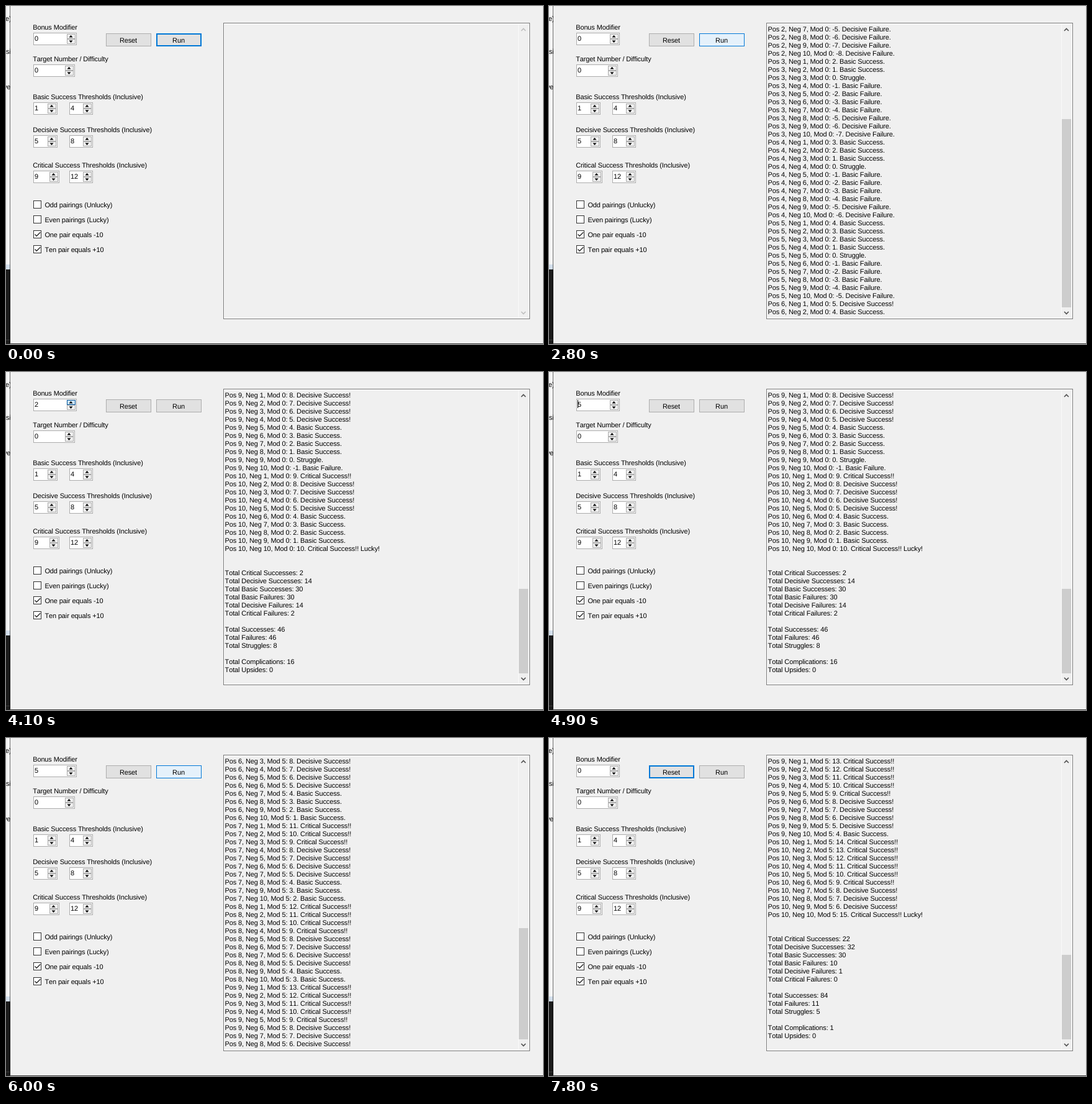
Recreate the animation shown at these times as an HTML page. Size 865 by 544 pixels, loop 8000 ms.

```html
<!DOCTYPE html>
<html lang="en">
<head>
<meta charset="utf-8">
<title>Dice odds</title>
<style>
  html, body { margin: 0; width: 100%; height: 100%; overflow: hidden; background: #f0f0f0; }
  svg { display: block; width: 865px; height: 544px; }
  text {
    font: 11px "Liberation Sans", Arial, sans-serif;
    letter-spacing: -.13px;
    font-kerning: none;
    text-rendering: geometricPrecision;
    white-space: pre;
  }
</style>
</head>
<body>
<svg id="stage" viewBox="0 0 865 544"></svg>
<script>
const LOOP = 8000, ROWS = 36;
const stage = document.getElementById('stage');

function add(tag, attrs, content = '') {
  const el = document.createElementNS('http://www.w3.org/2000/svg', tag);
  set(el, attrs);
  el.textContent = content;
  return stage.appendChild(el);
}
function set(el, attrs) {
  for (const key in attrs) el.setAttribute(key, attrs[key]);
}
const rect = (x, y, width, height, fill) => add('rect', { x, y, width, height, fill });
const label = (x, y, s, more) => add('text', { x, y, fill: '#000', ...more }, s);
const line = (d, stroke, width = 1) =>
  add('path', { d, stroke, fill: 'none', 'stroke-width': width });

// A box whose border lies inside its bounds.
function frame(x, y, w, h) {
  const el = add('rect', {});
  return (fill, stroke, b = 1) => set(el, {
    x: x + b / 2, y: y + b / 2, width: w - b, height: h - b, fill, stroke, 'stroke-width': b
  });
}

const SKIN = {
  idle: ['#e1e1e1', '#adadad', 1],
  focus: ['#e1e1e1', '#0078d7', 2],
  hover: ['#e5f1fb', '#0078d7', 1]
};
const SPIN = {
  idle: ['#f0f0f0', '#acacac'],
  hover: ['#e5f1fb', '#0078d7'],
  press: ['#cce4f7', '#005499']
};

function button(x, s) {
  const paint = frame(x, 44, 73, 21);
  label(x + 36, 59, s, { 'text-anchor': 'middle' });
  return mode => paint(...SKIN[mode]);
}

function spinner(x, y, w, value) {
  frame(x, y, w, 20)('#fff', '#acacac');
  const digits = label(x + 2, y + 13, value);
  const left = x + w - 16, tip = left + 6.5;
  const up = frame(left, y + 2, 14, 8);
  const down = frame(left, y + 10, 14, 8);
  up(...SPIN.idle);
  down(...SPIN.idle);
  add('path', { d: `M${tip} ${y + 4}l3 3.5h-6z` });
  add('path', { d: `M${tip} ${y + 16}l3-3.5h-6z` });
  return { digits, spin: mode => up(...SPIN[mode]) };
}

function checkbox(y, s, on) {
  frame(44, y, 13, 13)('#fff', '#333');
  if (on) line(`M46.5 ${y + 6.5}l2.8 2.8l6-6`, '#222', 1.3);
  label(62.4, y + 11, s);
}

// Windows behind the dialog
rect(0, 0, 865, 544, '#f0f0f0');
rect(0, 0, 7, 416, '#f4f4f4');
[['e)', -1, 24], ['si', 0, 77], ['ve', -4, 134]].forEach(([s, x, y]) => label(x, y, s));
rect(0, 416, 7, 8, '#d3dfec');
rect(0, 424, 7, 120, '#1b1b1b');
rect(0, 537, 6, 1, '#3a3a3a');
rect(7, 0, 4, 543, '#f0f0f0');
rect(6, 0, 1, 544, 'rgba(0,0,0,.55)');
rect(6, 543, 859, 1, '#3c3c3c');

// Form
[[38, 'Bonus Modifier'], [89, 'Target Number / Difficulty'],
 [150, 'Basic Success Thresholds (Inclusive)'],
 [203, 'Decisive Success Thresholds (Inclusive)'],
 [260, 'Critical Success Thresholds (Inclusive)']].forEach(([y, s]) => label(43.2, y, s));
const bonus = spinner(44, 43, 70, 0);
const caret = rect(46, 45, 1, 13, '#000');
[[44, 94, 67, 0], [44, 155, 39, 1], [102, 155, 38, 4], [44, 208, 39, 5],
 [102, 208, 38, 8], [44, 265, 42, 9], [102, 265, 38, 12]].forEach(a => spinner(...a));
const reset = button(161, 'Reset');
const run = button(242, 'Run');
checkbox(313, 'Odd pairings (Unlucky)', false);
checkbox(337, 'Even pairings (Lucky)', false);
checkbox(361, 'One pair equals -10', true);
checkbox(385, 'Ten pair equals +10', true);

// Output box
const output = frame(350, 27, 494, 477);
frame(351, 28, 492, 475)('#f0f0f0', '#fff');
rect(825, 29, 1, 473, '#fafafa');
const thumb = rect(826, 0, 15, 0, '#cdcdcd');
const arrows = [line('M830 40l3.5-3.5l3.5 3.5', '', 1.6), line('M830 492l3.5 3.5l3.5-3.5', '', 1.6)];
const rows = Array.from({ length: ROWS }, (_, i) => label(352.6, 41 + 13 * i, ''));

function report(mod) {
  const tiers = ['Critical', 'Decisive', 'Basic'];
  const count = { Success: [0, 0, 0], Failure: [0, 0, 0] };
  const out = [];
  let struggles = 0;
  for (let pos = 1; pos <= 10; pos++) {
    for (let neg = 1; neg <= 10; neg++) {
      const low = pos + neg === 2, high = pos + neg === 20;
      const score = pos - neg + mod + (high ? 10 : low ? -10 : 0);
      const size = Math.abs(score);
      let verdict = 'Struggle.';
      if (size) {
        const kind = score > 0 ? 'Success' : 'Failure';
        const tier = size > 8 ? 0 : size > 4 ? 1 : 2;
        count[kind][tier]++;
        verdict = `${tiers[tier]} ${kind}${score > 0 ? ['!!', '!', '.'][tier] : '.'}`;
      } else struggles++;
      out.push(`Pos ${pos}, Neg ${neg}, Mod ${mod}: ${score}. ${verdict}` +
        (low ? ' Unlucky.' : high ? ' Lucky!' : ''));
    }
  }
  const good = count.Success, bad = count.Failure;
  const sum = list => list.reduce((a, b) => a + b);
  return out.concat('', '',
    tiers.map((name, i) => `Total ${name} Successes: ${good[i]}`),
    [2, 1, 0].map(i => `Total ${tiers[i]} Failures: ${bad[i]}`), '',
    `Total Successes: ${sum(good)}`, `Total Failures: ${sum(bad)}`,
    `Total Struggles: ${struggles}`, '',
    `Total Complications: ${bad[0] + bad[1]}`, 'Total Upsides: 0', '');
}
const reports = { 0: report(0), 5: report(5) };
const FULL = reports[0].length;

// Shows the first n lines, scrolled to the end; a short log leaves older rows below it.
function showLog(mod, n) {
  const top = Math.max(0, n - ROWS);
  const old = mod ? reports[0].slice(-ROWS) : [];
  rows.forEach((row, i) => {
    const fresh = top + i < n ? reports[mod][top + i] : '';
    row.textContent = n < ROWS && i > n ? old[i] || '' : fresh;
  });
  const size = top ? Math.round(437 * ROWS / n) : 0;
  set(thumb, { y: 485 - size, height: size });
  arrows.forEach(a => set(a, { stroke: top ? '#505050' : '#bfbfbf' }));
}

// Each step lists only what changes.
const steps = [
  [0, { value: 0, spin: 'idle', caret: 0, run: 'focus', reset: 'idle', edge: '#7a7a7a', mod: 0, n: 0 }],
  [1200, { edge: '#171717' }],
  [1500, { edge: '#7a7a7a' }],
  [2400, { run: 'hover' }],
  [2700, { n: 14 }],
  [2800, { n: 52 }],
  [2900, { n: 88 }],
  [3000, { n: FULL, run: 'focus' }],
  [3200, { spin: 'hover' }],
  [3900, { spin: 'press', value: 1, run: 'idle', caret: 1 }],
  [4000, { spin: 'hover' }],
  [4100, { spin: 'press', value: 2, caret: 0 }],
  [4200, { spin: 'hover' }],
  [4300, { spin: 'press', value: 3 }],
  [4500, { value: 4 }],
  [4600, { spin: 'hover', caret: 1 }],
  [4700, { spin: 'press', value: 5 }],
  [4800, { spin: 'idle', reset: 'hover' }],
  [4900, { reset: 'idle' }],
  [5100, { run: 'hover', caret: 0 }],
  [5600, { caret: 1 }],
  [5800, { caret: 0, mod: 5, n: 14 }],
  [5900, { n: 52 }],
  [6000, { n: 88 }],
  [6100, { n: FULL, run: 'focus' }],
  [7300, { reset: 'hover' }],
  [7600, { value: 0, run: 'idle' }],
  [7800, { reset: 'focus' }]
];
let state = {};
const states = steps.map(([at, change]) => ({ at, ...(state = { ...state, ...change }) }));

function draw(s) {
  bonus.digits.textContent = s.value;
  bonus.spin(s.spin);
  set(caret, { opacity: s.caret });
  run(s.run);
  reset(s.reset);
  output('#f0f0f0', s.edge);
  showLog(s.mod, s.n);
}

const start = performance.now();
let shown;
function tick() {
  const t = (performance.now() - start) % LOOP;
  const now = states.findLast(s => s.at <= t);
  if (now !== shown) draw(shown = now);
  requestAnimationFrame(tick);
}
tick();
</script>
</body>
</html>
```
